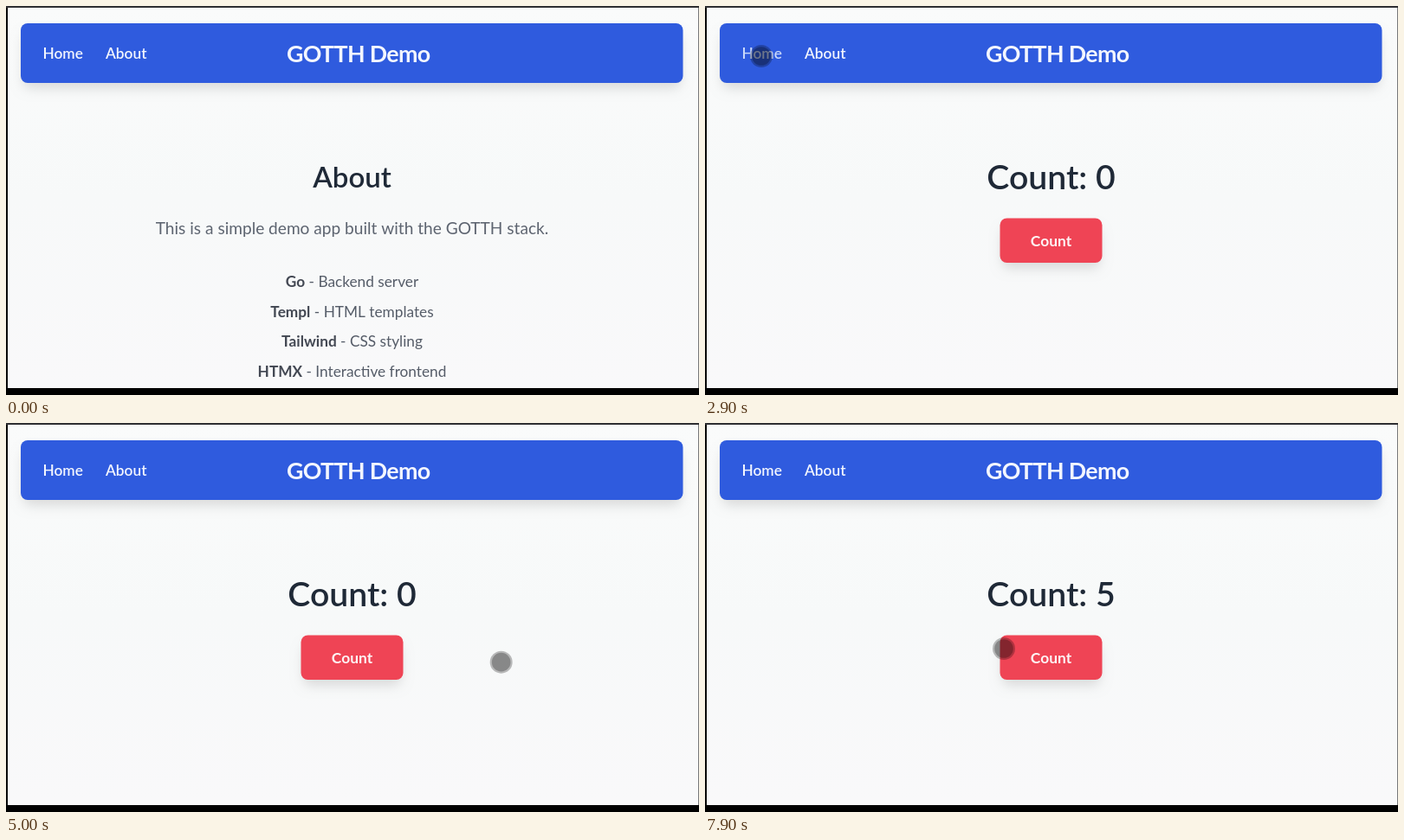
Animation of 800x450 px, one loop 8000 ms. Source, as an HTML page with a canvas:

```html
<!DOCTYPE html>
<html lang="en">
<head>
<meta charset="utf-8">
<title>GOTTH Demo</title>
<style>
html, body { margin: 0; width: 100%; height: 100%; overflow: hidden; background: #000; }
canvas { display: block; width: 800px; height: 450px; }
</style>
</head>
<body>
<canvas id="stage" width="800" height="450"></canvas>
<script>
const c = document.getElementById('stage').getContext('2d');
const LOOP = 8000, STEP = 100, MID = 399.5;

// The system face shows for one step while a page is swapped
const LATO = { family: 'Lato, sans-serif', scale: 1, strong: 600 };
const SYSTEM = { family: '"Open Sans", "Noto Sans", sans-serif', scale: 0.975, strong: 700 };
const SWAPS = [2300, 3700, 4600];

const LIST = {
  Go: 'Backend server',
  Templ: 'HTML templates',
  Tailwind: 'CSS styling',
  HTMX: 'Interactive frontend'
};

const START = [762, 262], HOME = [65, 58];
const MOVES = [
  { from: 400, until: 1300, to: [130, 49] },
  { from: 1500, until: 2200, to: HOME },
  { from: 3100, until: 3600, to: [135, 53] },
  { from: 4000, until: 4500, to: HOME },
  { from: 4800, until: 5100, to: [635, 304] },
  { from: 5100, until: 5800, to: [398, 275] },
  { from: 7600, until: 7900, to: [345, 261] }
];
const FIRST_CLICK = 6600, CLICK_GAP = 250, CLICKS = 5;

const clamp = (v, lo, hi) => Math.min(hi, Math.max(lo, v));
const easeOut = k => 1 - (1 - k) ** 2;

function pointerAt(t) {
  return MOVES.reduce((pos, { from, until, to }) => {
    const k = easeOut(clamp((t - from) / (until - from), 0, 1));
    return pos.map((v, i) => v + (to[i] - v) * k);
  }, START);
}

function setFont(face, size, weight, tracking = 0) {
  c.font = `${weight} ${size * face.scale}px ${face.family}`;
  c.letterSpacing = tracking * size + 'px';
}

function text(str, x, y, face, size, weight, color, align = 'left', tracking = 0) {
  setFont(face, size, weight, tracking);
  c.textAlign = align;
  c.fillStyle = color;
  c.fillText(str, x, y);
}

function box(x, y, w, h) {
  c.beginPath();
  c.roundRect(x, y, w, h, 8);
  c.fill();
}

function card(x, y, w, h, color) {
  c.fillStyle = color;
  c.save();
  c.shadowColor = 'rgba(0,0,0,.13)';
  c.shadowBlur = 14;
  c.shadowOffsetY = 9;
  box(x + 3, y + 3, w - 6, h - 6);
  c.restore();
  box(x, y, w, h);
}

function backdrop() {
  c.fillStyle = '#000';
  c.fillRect(0, 0, 800, 450);
  const bg = c.createLinearGradient(0, 0, 0, 442);
  ['#fafbfb', '#f7f9f9', '#f9f9fa'].forEach((color, i) => bg.addColorStop(i / 2, color));
  c.fillStyle = bg;
  c.fillRect(2, 2, 797, 440);
  c.fillStyle = '#2f2f33';
  c.fillRect(0, 0, 800, 2);
  c.fillStyle = '#77787a';
  c.fillRect(799, 2, 1, 440);
}

function header(face, dimHome) {
  const light = '#f3f6fe';
  card(17, 20, 764.5, 69, '#2f5bde');
  text('Home', 42.5, 61, face, 17.3, face.strong, dimHome ? '#c9d8fa' : light);
  text('About', face === LATO ? 115 : 117, 61, face, 17.3, face.strong, light);
  text('GOTTH Demo', 324, 64.5, face, 26.8, 700, light, 'left', -0.025);
}

function aboutPage(face) {
  text('About', MID, 209.5, face, 33, face.strong, '#1f2937', 'center');
  text('This is a simple demo app built with the GOTTH stack.',
    MID, 264, face, 19.1, 400, '#5d6470', 'center');
  Object.entries(LIST).forEach(([name, role], i) => {
    const y = 325 + i * 34.6, size = 17.25, tail = ' - ' + role;
    setFont(face, size, 700);
    const nameWidth = c.measureText(name).width;
    setFont(face, size, 400);
    const x = MID - (nameWidth + c.measureText(tail).width) / 2;
    text(name, x, y, face, size, 700, '#434853');
    text(tail, x + nameWidth, y, face, size, 400, '#555c68');
  });
}

function homePage(face, count) {
  text('Count: ' + count, MID, 212, face, 39.2, face.strong, '#1f2937', 'center');
  card(340.5, 245.5, 118, 51.5, '#ef4455');
  text('Count', MID, 278, face, 17.4, 700, '#fdf3f4', 'center');
}

function disc(x, y, r) {
  c.fillStyle = 'rgba(0,0,0,.26)';
  c.beginPath();
  c.arc(x, y, r, 0, 7);
  c.fill();
}

function arrow(x, y) {
  const shape = new Path2D('M0 0V18L4.2 14.2L7 21L10 19.7L7.2 13H12.7Z');
  c.save();
  c.translate(x, y);
  c.fillStyle = '#fff';
  c.strokeStyle = '#18181c';
  c.lineWidth = 1.2;
  c.stroke(shape);
  c.fill(shape);
  c.restore();
}

function draw(t) {
  const justSwapped = span => SWAPS.some(s => t >= s && t < s + span);
  const onHome = SWAPS.filter(s => t >= s + STEP).length % 2 === 1;
  const face = justSwapped(STEP) ? SYSTEM : LATO;
  const clicks = Math.floor((t - FIRST_CLICK) / CLICK_GAP) + 1;

  backdrop();
  header(face, t > 2400 && t < 4000);
  if (onHome) homePage(face, clamp(clicks, 0, CLICKS));
  else aboutPage(face);

  if (t < MOVES[0].from) return;
  const [x, y] = pointerAt(t);
  if (justSwapped(2 * STEP)) arrow(x, y);
  else [13, 10.8].forEach(r => disc(x, y, r));
}

function tick() {
  const t = performance.now() % LOOP;
  draw(Math.floor(t / STEP) * STEP);
  requestAnimationFrame(tick);
}
tick();
</script>
</body>
</html>
```
